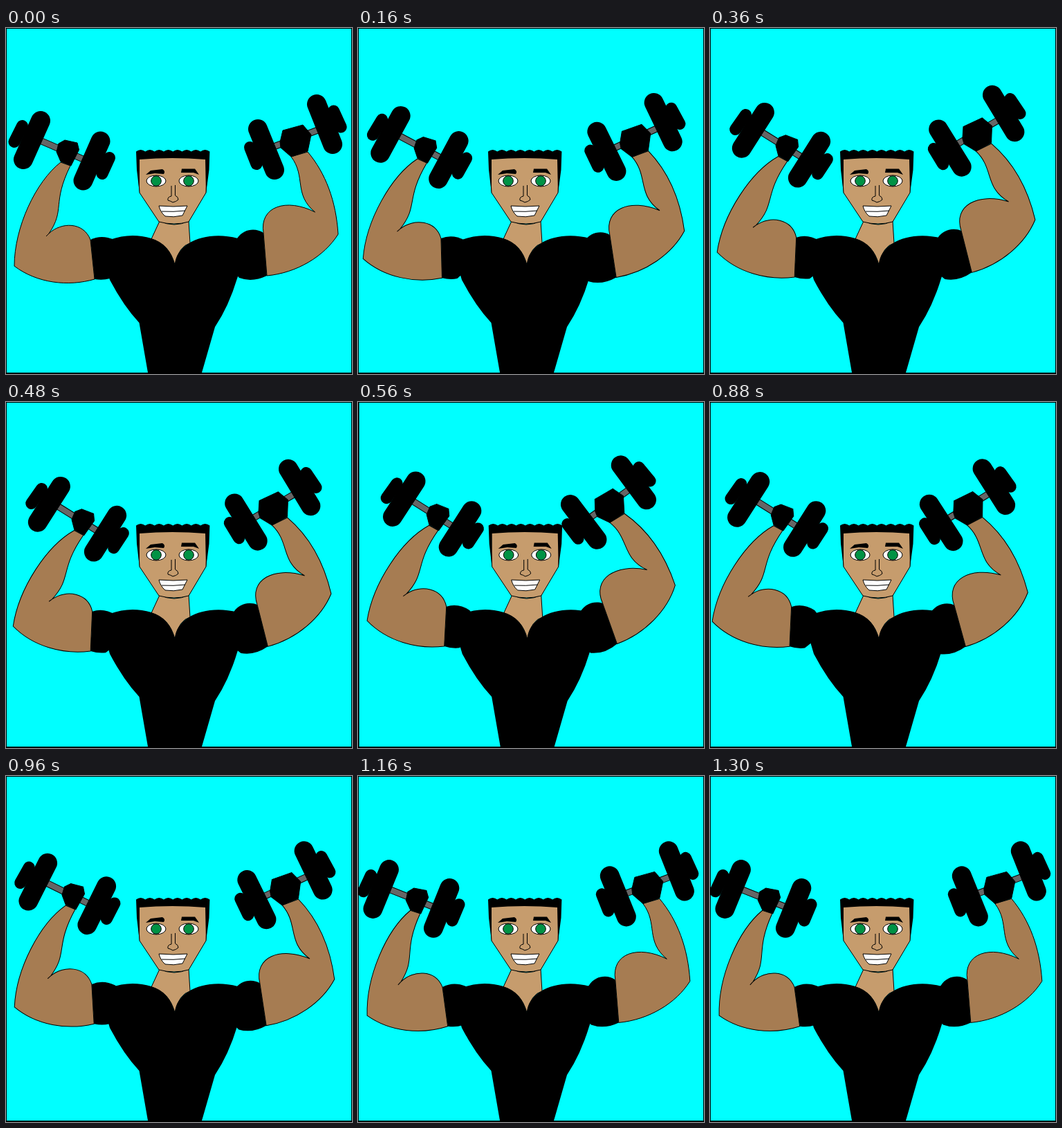
Write an HTML page that moves like this. It is 500 px wide and 500 px high and loops after 1400 ms.

```html
<!DOCTYPE html>
<html lang="en">
<head>
<meta charset="utf-8">
<title>Dumbbell curls</title>
<style>
  html, body { margin: 0; height: 100%; overflow: hidden; background: #000; }
  svg { display: block; width: 100vw; height: 100vh; }
  .skin { fill: #a67c52; }
  .light { fill: #c69c6d; }
  .line { fill: none; }
  .solid { stroke: none; }
  .plate { stroke-width: 28; stroke-linecap: round; }
  .cap { stroke-width: 17; stroke-linecap: round; }
  .rod { stroke-width: 10; }
  .rod + .rod { stroke: #666; stroke-width: 8; }
</style>
</head>
<body>
<svg viewBox="0 0 500 500" stroke="#000">
  <g id="scene">
    <rect class="solid" x="1" y="1" width="498" height="497" fill="#0ff"/>
    <path class="light" d="M222 279L210 305Q236 312 244 342Q250 315 266 311L264 279Q243 289 222 279Z"/>
    <path class="solid" d="M150 306Q180 295 210 304Q236 312 244 342C246 310 290 292 335 304L345 330L334 362Q322 402 302 432L283 498H205L192.500 426Q170 402 150 364L140 330Z"/>
    <path class="light" d="M190 185L193 238L221 280Q243 286 264 280L289 238L292 185Z"/>
    <path id="hair" class="solid"/>
    <path class="solid" d="M202 212L209 206L226 204Q231 207 228 211L215 210Z"/>
    <path class="solid" d="M254 203.500H273L279 212L271 209H253Z"/>
    <g id="eye">
      <ellipse cx="217" cy="221" rx="14" ry="8" fill="#fff"/>
      <circle cx="217" cy="221" r="7.300" fill="#009245"/>
    </g>
    <use href="#eye" x="47"/>
    <path class="line" d="M239 228V243Q233 244 234 249Q238 250 241 252Q246 251 249 248Q249 244 244.500 242V227"/>
    <path fill="#fff" d="M221 257Q242 259 262 257L255 271Q242 274 230 272Q223 266 221 257Z"/>
    <path class="line" d="M225 265Q242 266 259 264"/>
  </g>
  <path d="M499.500 0V500"/>
  <g id="left">
    <path class="solid" d="M122 306Q138 298 156 306L180 330L150 362Q140 365 128 363Z"/>
    <path class="skin" d="M79 194C43 222 12 288 12 344C45 369 90 374 128 363L122 306C112 280 80 280 62 297C86 262 66 254 93 199Z"/>
    <path class="line" d="M62 297L58 301"/>
    <path class="rod" d="M48 162L116 191.500"/>
    <path class="rod" d="M48 162L116 191.500"/>
    <path class="plate" d="M50 134L25 190M136.500 163.500L111.500 220.500"/>
    <path class="cap" d="M23.500 141.500L12 164.500M149.500 187.500L139 210.500"/>
    <path d="M73 179L76 167L85 162L103 166L105.500 176L94 199L79 193Z"/>
  </g>
  <g id="right">
    <path class="solid" d="M372 296C362 289 344 289 334 304L310 330L337 361Q356 368 377 358Z"/>
    <path class="skin" d="M412 186C434 215 415 240 446.500 266C405 245 366 258 372 296L377 358C420 354 460 330 480 298C477 250 462 210 436 179Z"/>
    <path class="rod" d="M383 173L452 147"/>
    <path class="rod" d="M383 173L452 147"/>
    <path class="plate" d="M364 146L388 205M449 110L472 168"/>
    <path class="cap" d="M352.500 172.500L362 196.500M473.500 120L484 143"/>
    <path d="M396 165L400 148L429 140L441 154L436 178L412 186L397 173Z"/>
  </g>
</svg>
<script>
  const LOOP = 1400;
  const byId = id => document.getElementById(id);

  // Wavy top edge, straight sides, gently arched hairline
  byId('hair').setAttribute('d',
    'M188 178.500' + 'q6.600 -5 13.300 0'.repeat(8) +
    'L293.500 205L289 239L288 190Q240 186 193 190V239L189 205Z');

  // Each pose: start time, then grip position and arm angle for both sides
  const poses = [
    { at: 0,    left: [80.8, 177, 0],      right: [418.2, 157.2, 0] },
    { at: 160,  left: [89, 172.2, 4.5],    right: [400.2, 157.2, -4] },
    { at: 360,  left: [103, 169, 8.5],     right: [385.5, 148.5, -9.6] },
    { at: 560,  left: [107.2, 161.8, 9],   right: [362.2, 144.8, -15], shift: 0.7 },
    { at: 760,  left: [96.2, 162.2, 8.6],  right: [372.2, 148.5, -10.8] },
    { at: 960,  left: [88.8, 170.2, 2.7],  right: [403.2, 157.5, -4] },
    { at: 1160, left: [77, 177.2, -1.7],   right: [418, 155.6, 0] }
  ];
  const rest = poses[0];

  function placeArm(side, [x, y, angle]) {
    const [restX, restY] = rest[side];
    byId(side).setAttribute('transform',
      `translate(${x} ${y}) rotate(${angle}) translate(${-restX} ${-restY})`);
  }

  function draw() {
    const time = performance.now() % LOOP;
    const pose = poses.findLast(p => p.at <= time);
    byId('scene').setAttribute('transform', `translate(${pose.shift || 0} 0)`);
    placeArm('left', pose.left);
    placeArm('right', pose.right);
    requestAnimationFrame(draw);
  }
  draw();
</script>
</body>
</html>
```
